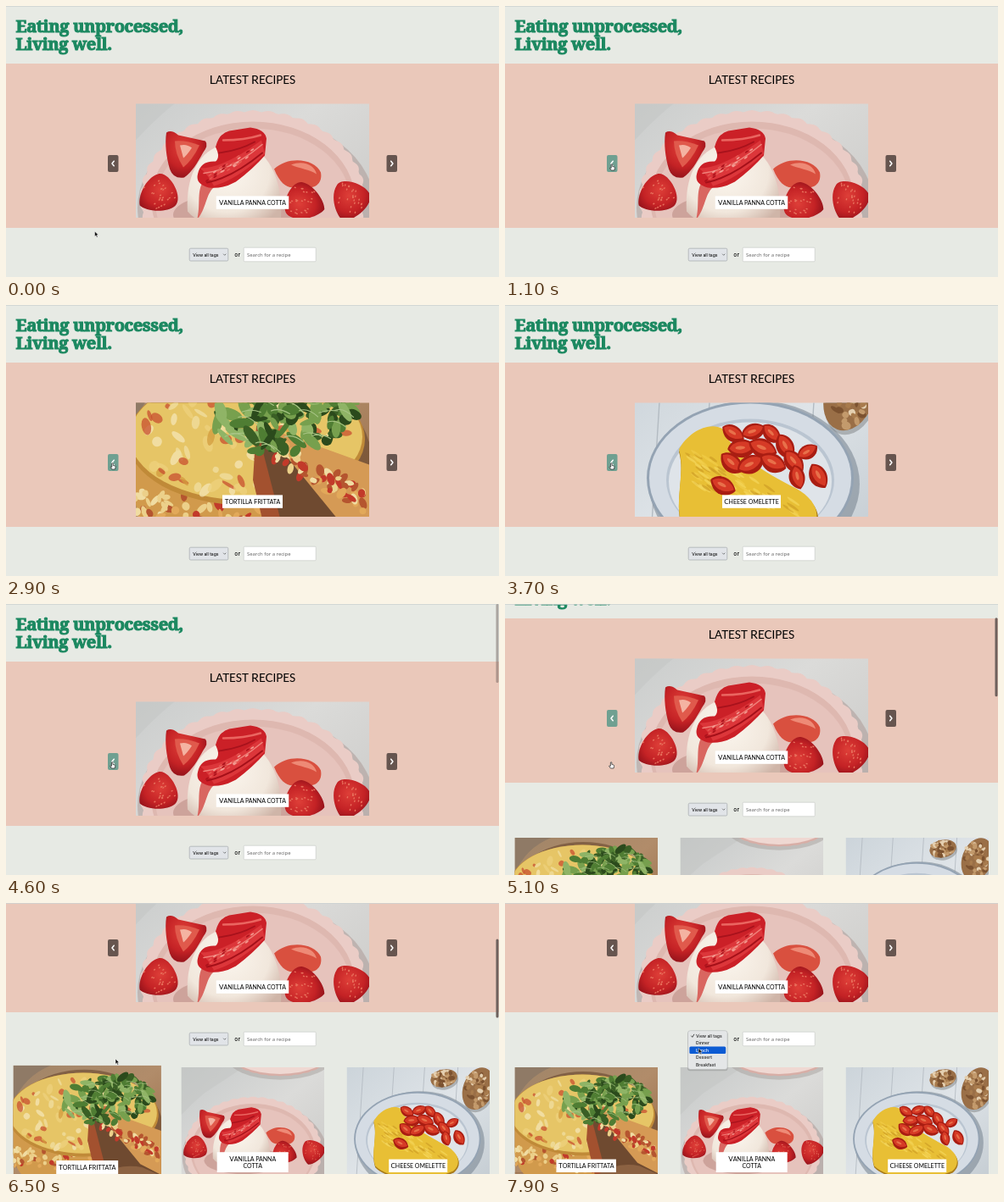
These frames come from a looping animation (581 by 320 pixels, 8 s). An HTML page:

```html
<!DOCTYPE html>
<html lang="en">
<head>
<meta charset="utf-8">
<title>Recipes</title>
<style>
html, body { margin: 0; width: 100%; height: 100%; overflow: hidden; background: #e7eae4; }
svg { display: block; }
text { font-family: Inter, "Open Sans", sans-serif; fill: #111; }
.logo { font: 900 20.2px "Noto Serif", serif; letter-spacing: -.45px; fill: #1b8860; stroke: #1b8860; stroke-width: 1px; }
.caps { font-family: Lato, sans-serif; text-anchor: middle; fill: #000; }
.ui { font-size: 5px; font-weight: 500; }
.menu { font-size: 5.1px; font-weight: 500; }
.hint { font: 5.9px "Noto Sans", sans-serif; fill: #666; }
</style>
</head>
<body>
<svg id="stage" width="581" height="320" viewBox="0 0 581 320"></svg>
<script>
const LOOP = 8000, STEP = 100;

function seeded(seed) {
  return () => {
    seed = (seed * 16807) % 2147483647;
    return seed / 2147483647;
  };
}

// Shape helpers
const rect = (x, y, w, h, fill, more = '') =>
  `<rect x="${x}" y="${y}" width="${w}" height="${h}" fill="${fill}" ${more}/>`;
const oval = (x, y, rx, ry, fill, turn = 0, more = '') =>
  `<ellipse cx="${x}" cy="${y}" rx="${rx}" ry="${ry}" fill="${fill}" transform="rotate(${turn} ${x} ${y})" ${more}/>`;
const path = (d, fill, more = '') => `<path d="${d}" fill="${fill}" ${more}/>`;
const line = (d, color, width, more = '') =>
  path(d, 'none', `stroke="${color}" stroke-width="${width}" stroke-linecap="round" stroke-linejoin="round" ${more}`);
const group = (body, more = '') => `<g ${more}>${body}</g>`;
const text = (x, y, s, cls, more = '') => `<text x="${x}" y="${y}" class="${cls}" ${more}>${s}</text>`;
const pick = (r, list) => list[Math.floor(r() * list.length)];

// Small capitals with slightly larger initials
function caps(x, y, s, big, small) {
  const body = s.replace(/[A-Z]/g, c => `<tspan font-size="${big}">${c}</tspan>`)
    .replace(/(^|>)([^<>]+)(?=<|$)/g, (m, a, b) => a + b.toUpperCase());
  return text(x, y, body, 'caps', `font-size="${small}"`);
}

function scatter(seed, n, draw) {
  const rnd = seeded(seed);
  return Array.from({ length: n }, () => draw(rnd)).join('');
}

// Scalloped plate edge
function scallop(cx, cy, rx, ry, n, depth) {
  let d = '';
  for (let i = 0; i <= 240; i++) {
    const a = i / 240 * Math.PI * 2, k = 1 + depth * Math.abs(Math.sin(a * n / 2));
    d += (i ? 'L' : 'M') + (cx + rx * k * Math.cos(a)).toFixed(1) + ' ' + (cy + ry * k * Math.sin(a)).toFixed(1);
  }
  return d + 'Z';
}

function berry(x, y, size, turn, seed) {
  const seeds = scatter(seed, 26, r =>
    oval((r() - .5) * 28, (r() - .55) * 26, .7, 1.1, '#e8705c'));
  return group(
    path('M-19 -10C-17 -22 16 -22 19 -9C21 4 8 21 0 23C-9 20 -22 4 -19 -10Z', 'url(#berry)') + seeds,
    `transform="translate(${x} ${y}) rotate(${turn}) scale(${size})"`);
}

function wedge(x, y, size, turn) {
  return group(
    path('M-14 -4C-8 -14 9 -13 15 1C8 12 -8 12 -14 -4Z', '#a91d12') +
    path('M-12 -4C-6 -11 8 -9 13 0C6 6 -7 6 -12 -4Z', '#d63a26') +
    oval(-1, -2, 5, 1.8, '#e8704a', 12),
    `transform="translate(${x} ${y}) rotate(${turn}) scale(${size})"`);
}

function panna() {
  const rhubarb = path('M94 100Q98 84 110 81L135 77Q152 79 154 90L152 110Q138 126 118 141Q102 150 86 148Q70 144 73 132Q76 116 94 117Q100 112 94 100Z', '#cb2027') +
    path('M76 125Q104 125 148 92L152 108Q120 138 92 146Q86 134 76 125Z', '#dc363a') +
    line('M103 92Q128 92 147 86', '#ea6560', 2.4) + line('M80 131Q112 128 149 97', '#f0827a', 1.6) +
    line('M84 142Q114 136 149 107', '#a51019', 2) + line('M98 107Q122 104 140 94', '#a8121c', 2) +
    scatter(5, 34, r => {
      const k = r();
      return oval(84 + k * 58, 133 - k * 36 + r() * 10, 2.4, .9, pick(r, ['#f29a90', '#e6544f', '#ad131c']), -35);
    });
  return rect(0, 0, 275, 224, 'url(#marble)') +
    path('M0 92Q20 70 44 50L120 0H0Z', '#c3c5c4', 'opacity=".5"') +
    oval(190, -22, 104, 46, '#a8a29e', 0, 'opacity=".5"') +
    path(scallop(190, -30, 100, 46, 34, .02), '#d8aea6') + oval(190, -33, 100, 46, '#efd8d2') +
    oval(142, 172, 140, 108, '#a99691', 0, 'opacity=".5"') +
    path(scallop(138, 161, 130, 102, 42, .025), '#eaccc6') +
    oval(138, 162, 120, 92, '#deb8b0') + oval(138, 165, 115, 87, '#e6c3bc') +
    oval(120, 180, 76, 26, '#b5837c', 0, 'opacity=".5"') +
    path('M163 126C180 110 211 114 218 130C221 146 206 152 192 146C182 150 172 148 163 126Z', '#d9503f') +
    path('M183 121C198 115 211 122 213 132C204 126 194 126 183 121Z', '#ee8a76') +
    path('M61 176C58 130 78 96 117 95C152 96 174 134 171 184C150 202 82 202 61 176Z', 'url(#cream)') +
    path('M80 140C71 152 77 168 72 186C84 172 82 154 94 146Z', '#d96660') +
    path('M36 83Q42 79 50 86L82 93Q86 98 79 107C73 118 66 130 57 136Q44 138 40 126C36 112 34 96 36 83Z', 'url(#berry)') +
    path('M46 93Q60 92 75 98Q67 115 56 124Q46 108 46 93Z', '#e05a4c') +
    path('M52 98Q60 96 66 101Q60 110 56 113Z', '#f4b3a2') +
    berry(27, 156, 1.12, 60, 7) + berry(198, 165, 1.12, -70, 11) + berry(253, 163, 1.12, 20, 23) + rhubarb;
}

function omelette() {
  const planks = [32, 91, 150, 214].map(x => line(`M${x} 0L${x - 14} 224`, '#b3bbc2', 1.4)).join('');
  const bread = (x, y, rx, ry, turn, seed) =>
    oval(x + 2, y + 5, rx, ry, '#7f8184', turn, 'opacity=".5"') + oval(x, y, rx, ry, '#9a6f47', turn) +
    scatter(seed, 46, r => {
      const a = r() * 6.28, k = Math.sqrt(r()) * .85;
      return oval(x + Math.cos(a) * k * rx, y + Math.sin(a) * k * ry, 3 + r() * 4, 2 + r() * 3,
        pick(r, ['#7c5230', '#c39a6c', '#e4cfb0', '#a87b4d']), r() * 180);
    });
  const bits = [
    [115, 86, 1, 20], [140, 84, 1, -30], [160, 86, .95, 35], [126, 104, 1.15, -15],
    [150, 104, 1.2, 10], [176, 101, 1.1, 50], [113, 121, 1.1, 30], [137, 123, 1.15, -35], [162, 121, 1.15, 15],
    [186, 119, 1.1, 40], [215, 136, 1.1, 50], [204, 108, .9, -40], [103, 148, 1.1, 15], [190, 137, 1, 65]
  ].map(b => wedge(...b)).join('');
  return rect(0, 0, 275, 224, 'url(#boards)') + planks +
    bread(187, 21, 26, 17, -12, 3) + bread(253, 41, 29, 42, 20, 8) +
    oval(141, 145, 124, 99, '#75828e', 0, 'opacity=".55"') + oval(136, 138, 122, 91, '#94a3b3') +
    oval(136, 138, 119, 88, '#d5dce4') + oval(136, 140, 99, 72, '#bac5d1') + oval(136, 142, 96, 70, '#dfe4e9') +
    path('M52 107C62 87 88 73 104 83C112 108 150 133 190 153C217 167 224 188 206 203C150 228 80 218 55 193C46 168 60 133 52 107Z', '#a87a1a') +
    path('M52 104C62 84 88 70 104 80C112 105 150 130 190 150C215 164 222 185 205 200C150 225 80 215 55 190C46 165 60 130 52 104Z', '#e8bf35') +
    scatter(17, 75, r => {
      const k = r();
      return oval(66 + k * 122, 102 + k * 62 + r() * 45 * (1 - k * .6), 5 + r() * 4, 1.5,
        pick(r, ['#f5d75c', '#f1cc48', '#cf9e26']), 35, 'opacity=".7"');
    }) + bits;
}

function tortilla() {
  const crumbs = (seed, n, x, y, dx, dy, dip) => scatter(seed, n, r => {
    const k = r();
    return oval(x + k * dx, y + k * dip + r() * dy, 3 + r() * 5, 2 + r() * 3,
      pick(r, ['#c23a2a', '#ecd08a', '#e2a95a', '#b5552f', '#f0dca2']), r() * 180);
  });
  const leaf = r => {
    const a = r() * 6.28, k = Math.sqrt(r());
    return oval(178 + Math.cos(a) * k * 82, 64 + Math.sin(a) * k * 44 - Math.cos(a) * k * 6, 6 + r() * 9, 3 + r() * 4,
      pick(r, ['#3a5f25', '#4f7d33', '#77a04e', '#2b4a1c', '#8fb466']), r() * 180);
  };
  return rect(0, 0, 275, 224, 'url(#wood)') +
    path('M0 70Q20 20 70 0H0Z', '#8f7a66') +
    scatter(4, 12, r => line(`M0 ${150 + r() * 74}h275`, '#80583a', .8, 'opacity=".45"')) +
    oval(132, 118, 146, 110, '#5c3a22', 0, 'opacity=".5"') +
    path('M-8 92C-6 150 0 205 30 212H172V100Z', '#d19a4c') +
    crumbs(45, 70, -4, 136, 160, 52, 16) +
    oval(130, 92, 140, 78, '#c08a38') + oval(130, 89, 137, 75, '#e6c566') +
    scatter(12, 95, r => {
      const a = r() * 6.28, k = Math.sqrt(r());
      return oval(130 + Math.cos(a) * k * 128, 89 + Math.sin(a) * k * 68, 3 + r() * 8, 2 + r() * 4,
        pick(r, ['#c8502f', '#f1dfa0', '#d39d3e', '#eed27c', '#f4e6b4']), r() * 180, 'opacity=".75"');
    }) +
    path('M142 76L275 130V224H168Z', '#6f4a30') +
    path('M142 76L180 224H158L138 140Z', '#a3512f') +
    path('M148 76L275 122V204L236 184Z', '#d59a55') +
    crumbs(21, 60, 164, 92, 104, 30, 58) +
    path('M150 214Q190 180 240 190L275 206V224H150Z', '#8c6242') +
    scatter(77, 130, leaf) +
    scatter(90, 22, r => line(`M${105 + r() * 130} ${30 + r() * 70}q10 -4 22 ${r() * 16 - 4}`, '#a9c586', 1.1));
}

const stops = list => list.map(([o, c]) => `<stop offset="${o}" stop-color="${c}"/>`).join('');
const linear = (id, list) => `<linearGradient id="${id}" x2="1" y2="1">${stops(list)}</linearGradient>`;
const radial = (id, list) => `<radialGradient id="${id}" cx=".42" cy=".35" r=".7">${stops(list)}</radialGradient>`;

const dishes = {
  panna: { name: 'Vanilla panna cotta', width: 85.5, draw: panna },
  tortilla: { name: 'Tortilla Frittata', width: 71, draw: tortilla },
  omelette: { name: 'Cheese omelette', width: 69, draw: omelette }
};

const defs = '<defs>' +
  linear('marble', [[0, '#c6c9c9'], [.5, '#dbdbd9'], [1, '#c9c8c6']]) +
  linear('boards', [[0, '#ccd4da'], [.5, '#dfe4e8'], [1, '#c4ccd2']]) +
  linear('wood', [[0, '#a08568'], [.5, '#b18c6a'], [1, '#93653f']]) +
  radial('berry', [[0, '#de3f38'], [.6, '#c42225'], [1, '#8c1019']]) +
  radial('cream', [[0, '#fbf6ee'], [.65, '#f1e7dc'], [1, '#cfb5a8']]) +
  Object.entries(dishes).map(([id, d]) => group(d.draw(), `id="${id}"`)).join('') + '</defs>';

function label(cx, bottom, width, lines) {
  const h = 7 + lines.length * 8.4;
  return rect(cx - width / 2, bottom - h, width, h, '#fff') +
    lines.map((s, i) => caps(cx, bottom - 5.1 - (lines.length - 1 - i) * 8.4, s, 8, 7)).join('');
}

const slide = id => group(
  `<svg x="153" y="115.5" width="275" height="134.5" viewBox="0 49 275 134.5"><use href="#${id}"/></svg>` +
  label(290.5, 239.8, dishes[id].width, [dishes[id].name]), `id="slide-${id}"`);

const card = (id, x, lines, width) => group(
  `<svg x="${x}" y="327" width="168.5" height="135" viewBox="0 0 275 220.3"><use href="#${id}"/></svg>` +
  label(x + 84.2, 451, width, lines), `id="card-${id}"`);

const arrowButton = (id, x, dir) =>
  rect(x, 176, 12.5, 20, '#66554f', `id="${id}" rx="2"`) +
  line(`M${x + 6.2 - dir} 183.2l${dir * 2.2} 2.8l${-dir * 2.2} 2.8`, '#fff', 1.5);

const page =
  text(11.5, 31, 'Eating unprocessed,', 'logo') + text(11.5, 52, 'Living well.', 'logo') +
  rect(0, 68, 581, 194, '#eac8ba') +
  caps(290.5, 91.6, 'Latest Recipes', 14.2, 13.4) +
  Object.keys(dishes).map(slide).join('') +
  arrowButton('prev', 120, -1) + arrowButton('next', 448.5, 1) +
  rect(216.2, 286.2, 45.6, 14.8, '#e1e4e8', 'rx="1.5" stroke="#a3a6ab" stroke-width=".7"') +
  text(220.3, 295.5, 'View all tags', 'ui') + line('M256.4 293l1.3 1.3l1.3 -1.3', '#333', .6) +
  text(269.3, 296, 'or', '', 'font-size="6.8" font-weight="500"') +
  rect(280.2, 285.2, 85, 16.6, '#fff', 'rx="1" stroke="#c9cbc8" stroke-width=".7"') +
  text(284, 295.6, 'Search for a recipe', 'hint') +
  card('tortilla', 11.5, ['Tortilla Frittata'], 70.5) +
  card('panna', 206.5, ['Vanilla panna', 'cotta'], 84) +
  card('omelette', 401.5, ['Cheese omelette'], 69);

const tags = ['View all tags', 'Dinner', 'Lunch', 'Dessert', 'Breakfast'];
const rowY = i => 152.6 + i * 8.45;
const menu = rect(215, 151.6, 47.6, 46.6, '#000', 'rx="3" opacity=".14"') +
  rect(215.5, 150.7, 46.6, 45.8, '#e4e6e7', 'rx="3" stroke="#b5b8b8" stroke-width=".6"') +
  rect(217.4, 0, 42.8, 8.5, '#0d5bd3', 'id="pick" rx="1.5"') +
  tags.map((s, i) => text(225, rowY(i) + 6.1, s, 'menu tag')).join('') +
  line('M219.6 157l1.2 1.4l2 -3.2', '#222', .8, 'id="tick"');

const pointer = path('M0 0V6.2L1.5 4.9L2.5 7.2L3.6 6.7L2.6 4.5H4.5Z', '#111', 'id="pointer" stroke="#fff" stroke-width=".5"');
const hand = path('M-.8 0Q0 -.9 .7 0V2.5L2.9 3Q3.6 3.3 3.4 4.4L2.9 7H-.7L-2.6 4.3Q-2.3 3.4 -.8 4.4Z', '#fff',
  'id="hand" stroke="#222" stroke-width=".7"');

document.getElementById('stage').innerHTML = defs +
  rect(0, 0, 581, 320, '#e7eae4') + group(page, 'id="page"') +
  rect(0, 0, 581, .8, '#cdd2d2') + rect(577.5, 0, 3, 93, '#6d605c', 'id="thumb" rx="1.5"') +
  group(menu, 'id="menu"') + group(pointer + hand, 'id="cursor"');

// Timeline: [time, value...]
const scrollKeys = [[4600, 0], [4800, 14], [5100, 51], [5400, 79], [5700, 93], [5900, 100], [6200, 122], [6400, 132], [6500, 133]];
const cursorKeys = [[0, 104.5, 266], [300, 105, 264], [1100, 126, 187], [5900, 125, 187], [6200, 126, 194],
  [6350, 127, 194], [6500, 129, 184], [7000, 238, 160], [7300, 238, 160], [7600, 231, 166], [7900, 228, 171.5]];
const hoverKeys = [[6100, 1], [6300, 1.035], [6500, 1.035], [6700, 1]];
const thumbKeys = [[4500, 0], [4700, 1], [7200, 1], [7500, 0]];
const slides = [[0, 'panna'], [2600, 'tortilla'], [3200, 'omelette'], [4100, 'panna']];

function at(keys, t, col = 1) {
  if (t <= keys[0][0]) return keys[0][col];
  for (let i = 1; i < keys.length; i++) {
    const a = keys[i - 1], b = keys[i];
    if (t <= b[0]) return a[col] + (b[col] - a[col]) * (t - a[0]) / (b[0] - a[0]);
  }
  return keys[keys.length - 1][col];
}

const $ = id => document.getElementById(id);
const set = (id, name, value) => $(id).setAttribute(name, value);
const show = (id, on) => set(id, 'visibility', on ? 'visible' : 'hidden');
const tagTexts = document.querySelectorAll('.tag');

function draw(t) {
  const scroll = at(scrollKeys, t), x = at(cursorKeys, t), y = at(cursorKeys, t, 2);
  const current = slides.filter(s => s[0] <= t).pop()[1];
  const onPrev = t >= 1000 && t < 5500, open = t >= 7300;
  const zoom = at(hoverKeys, t), row = Math.max(0, Math.min(4, Math.floor((y + .5 - rowY(0)) / 8.45)));

  set('page', 'transform', `translate(0 ${-scroll})`);
  set('card-tortilla', 'transform', `translate(95.75 394.5) scale(${zoom}) translate(-95.75 -394.5)`);
  Object.keys(dishes).forEach(id => set('slide-' + id, 'display', id === current ? 'inline' : 'none'));
  set('prev', 'fill', onPrev ? '#6fa091' : '#66554f');
  set('thumb', 'y', scroll * .32);
  set('thumb', 'opacity', at(thumbKeys, t));
  set('menu', 'display', open ? 'inline' : 'none');
  set('pick', 'y', rowY(row));
  tagTexts.forEach((el, i) => { el.style.fill = i === row ? '#fff' : '#222'; });
  set('tick', 'stroke', row ? '#222' : '#fff');
  set('cursor', 'transform', `translate(${x} ${y})`);
  show('pointer', !onPrev);
  show('hand', onPrev);
}

function tick() {
  const t = performance.now() % LOOP;
  draw(Math.floor(t / STEP) * STEP);
  requestAnimationFrame(tick);
}
tick();
</script>
</body>
</html>
```
